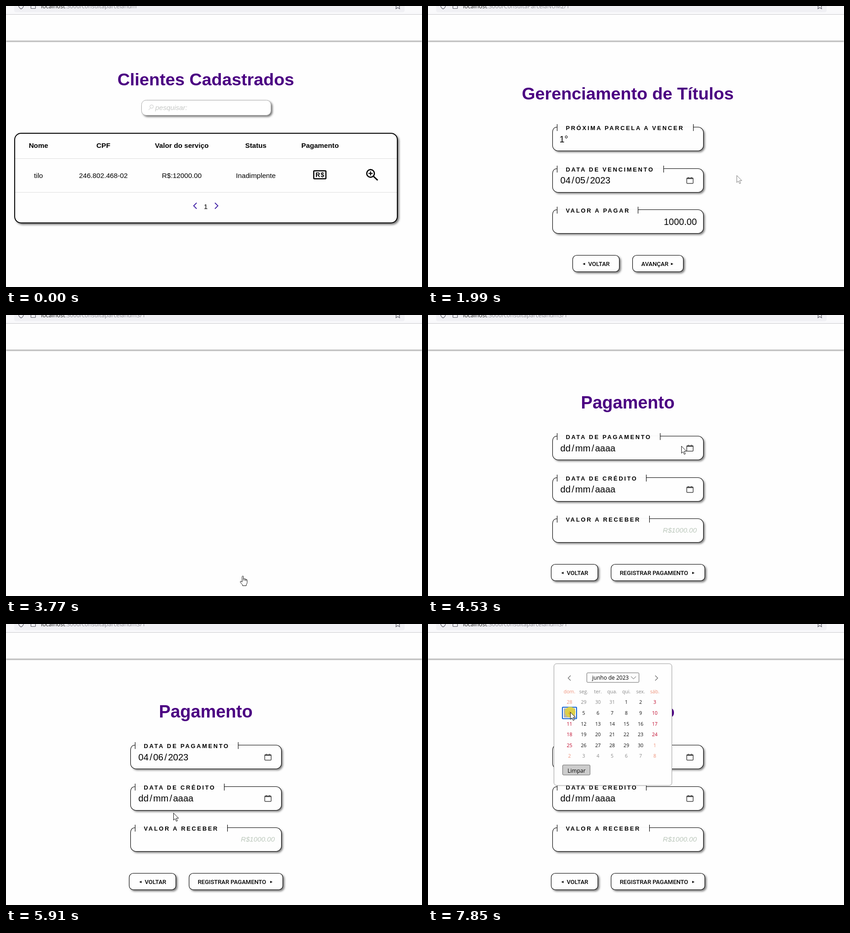
These frames come from a looping animation (910 by 616 pixels, 8 s). An HTML page:

```html
<!DOCTYPE html>
<html lang="pt-BR">
<head>
<meta charset="utf-8">
<title>Controle de parcelas</title>
<style>
html, body { margin: 0; width: 100%; height: 100%; overflow: hidden; background: #fefefe; }
svg { display: block; width: 910px; height: 616px; font-family: "Liberation Sans", Arial, sans-serif; }
.title { font-weight: bold; fill: #4b0082; text-anchor: middle; }
.cell { font-size: 15.2px; text-anchor: middle; }
.bold { font-weight: bold; }
.hint { font-size: 15.2px; font-style: italic; fill: #c6c8c6; }
.label { font-size: 12.8px; font-weight: bold; letter-spacing: 2.78px; }
.value { font-size: 20px; }
.button { font: 500 13px Roboto, sans-serif; }
.ui { font-family: "Open Sans", "Noto Sans", sans-serif; }
.line { fill: none; stroke: #000; }
.shadow { filter: drop-shadow(3px 3px 2px #777); }
</style>
</head>
<body>
<svg id="stage" viewBox="0 0 910 616"></svg>
<script>
const LOOP = 8000;
const stage = document.getElementById('stage');

const text = (x, y, cls, str, extra = '') => `<text x="${x}" y="${y}" class="${cls}" ${extra}>${str}</text>`;
const line = (d, color = '#000', width = 1, extra = '') =>
  `<path class="line" d="${d}" style="stroke:${color};stroke-width:${width}" ${extra}/>`;
const rect = (x, y, w, h, r, fill, stroke = 'none', width = 1, extra = '') =>
  `<rect x="${x}" y="${y}" width="${w}" height="${h}" rx="${r}" fill="${fill}" stroke="${stroke}" stroke-width="${width}" ${extra}/>`;
const group = (id, body) => `<g id="${id}">${body}</g>`;
const title = (y, size, str) => text(437, y, 'title', str, `font-size="${size}"`);

function browserBar() {
  return rect(0, 0, 910, 18, 0, '#f9f9fb') + rect(18, -20, 854, 33.5, 4, '#f0f0f4') +
    line('M0 18.5H910', '#cccccf') +
    line('M27.5-2C27.5 3 30 5 33 6.5 36 5 38.5 3 38.5-2', '#5b5b66', 1.2) +
    line('M54.5-2V4.5Q54.5 5.5 55.5 5.5H63.5Q64.5 5.5 64.5 4.5V-2', '#5b5b66', 1.2) +
    line('M852-1L853.5 1 853 6 857 3.5 861 6 860.5 1 862-1', '#5b5b66', 1.2) +
    `<text class="ui" x="76.5" y="5" font-size="12.6" fill="#8a8a92"><tspan fill="#222">localhost</tspan>:3000/<tspan id="path"></tspan></text>` +
    rect(0, 19, 910, 57, 0, '#fefefe', 'none', 1, 'style="filter:drop-shadow(0 2px 1.5px #999)"');
}

function clientPage() {
  const columns = [
    [71, 'Nome', 'tilo'], [213, 'CPF', '246.802.468-02'], [384.5, 'Valor do serviço', 'R$:12000.00'],
    [546.5, 'Status', 'Inadimplente'], [687, 'Pagamento', '']
  ];
  return title(174, 37.8, 'Clientes Cadastrados') +
    rect(296.5, 206.5, 283, 33, 10, '#fff', '#aaa', 1, 'class="shadow"') +
    '<circle cx="318.5" cy="220.5" r="3.8" class="line" style="stroke:#c6c8c6"/>' + line('M316 223.5L312 228', '#c6c8c6') +
    text(326.5, 228, 'hint', 'pesquisar:') +
    rect(19, 279, 837, 196.5, 14, '#fefefe', '#000', 2, 'class="shadow"') +
    line('M20 334.5H855M20 408.5H855', '#ddd') +
    columns.map(([x, head, body]) => text(x, 311, 'cell bold', head) + text(x, 377, 'cell', body)).join('') +
    rect(673.2, 361.2, 26.6, 17.6, 1.5, 'none', '#000', 2.5) +
    text(687, 375, 'cell bold', 'R$', 'style="font-size:14px;letter-spacing:1px"') +
    '<circle cx="797.5" cy="367" r="8.4" class="line" style="stroke-width:2.6"/>' +
    line('M793 367H802M797.5 362.5V371.5', '#000', 2.2) + line('M803.5 373L813 382', '#000', 3) +
    line('M417 431.5L410.5 438 417 444.5M457 431.5L463.5 438 457 444.5', '#3f1fa5', 1.8) +
    text(437, 445, 'cell', '1');
}

function field(y, label, tick, content) {
  const outline = `M283 ${y}Q272.5 ${y} 272.5 ${y + 12}V${y + 40}a12 12 0 0 0 12 12H590.5a12 12 0 0 0 12-12` +
    `V${y + 12}a12 12 0 0 0-12-12H${tick}M282.5 ${y - 6.5}v15M${tick} ${y - 6.5}v15`;
  return rect(272.5, y, 330, 52, 12, '#fefefe', 'none', 1, 'class="shadow"') + line(outline, '#000', 1.1) +
    text(301.5, y + 6.3, 'label', label) + content;
}

const dateParts = str => str.split('/')
  .map((part, i) => i ? `<tspan dx="2.3">/</tspan><tspan dx="2.3">${part}</tspan>` : part).join('');

function dateValue(y, str, id = '') {
  const icon = `M567.5 ${y + 21}h11q1.5 0 1.5 1.5v9q0 1.5-1.5 1.5h-11q-1.5 0-1.5-1.5v-9q0-1.5 1.5-1.5zM566 ${y + 22.5}h14M569.5 ${y + 19}v4M576.5 ${y + 19}v4`;
  return text(289.6, y + 33, 'value', dateParts(str), id && `id="${id}"`) +
    line(icon, '#444', 1.5, `class="icon" data-y="${y + 26}"`);
}

function button(x, w, str, textX, arrowX, dir) {
  return rect(x + .5, 546.5, w, 36, 9, '#fefefe', '#000', 1.1, 'class="shadow"') +
    `<path d="M${arrowX + 2.5 * dir} 565.5l${-5 * dir}-2.5v5z"/>` + text(textX, 570, 'button', str);
}

function titlesPage() {
  return title(205, 37.75, 'Gerenciamento de Títulos') +
    field(265.5, 'PRÓXIMA PARCELA A VENCER', 580.5, text(287.5, 298.5, 'value', '1°')) +
    field(356.5, 'DATA DE VENCIMENTO', 515.5, dateValue(356, '04/05/2023')) +
    field(446.5, 'VALOR A PAGAR', 459.5, text(588, 479.5, 'value', '1000.00', 'text-anchor="end"')) +
    button(316, 102, 'VOLTAR', 350.5, 341, -1) + button(447, 111, 'AVANÇAR', 466.5, 534, 1);
}

function calendar() {
  const names = ['dom.', 'seg.', 'ter.', 'qua.', 'qui.', 'sex.', 'sáb.'];
  const mid = 'text-anchor="middle"';
  let out = rect(-.5, -.5, 258, 267, 6, '#fefefe', '#999') +
    line('M36 25.5L30.5 31 36 36.5M221 25.5L226.5 31 221 36.5', '#666', 1.2) +
    rect(71.5, 19.5, 114, 21, 2, '#fefefe', '#666') + text(83, 34.6, 'ui', 'junho de 2023', 'font-size="12"') +
    line('M168 27.5L173.5 33 179 27.5', '#555') +
    rect(18, 95, 31, 25, 1, '#fefefe', '#0a5cd0', 2) + rect(21, 97.5, 25, 20, 1, '#b4b4b4');
  for (let i = 0; i < 49; i++) {
    const col = i % 7, row = Math.floor(i / 7), n = i - 10;
    const inMonth = row > 0 && n > 0 && n <= 30, weekend = col % 6 === 0;
    const label = row === 0 ? names[col] : n < 1 ? n + 31 : n > 30 ? n - 30 : n;
    const color = weekend ? (inMonth ? '#be0428' : '#ee9078') : inMonth ? '#111' : '#888';
    out += text(33.5 + 31.1 * col, (64.3 + 23.6 * row).toFixed(1), 'ui', label,
      `${mid} font-size="10.6" fill="${color}" font-weight="${n === 4 && inMonth ? 700 : inMonth ? 500 : 400}"`);
  }
  return out + rect(18.5, 221.5, 60, 22, 2, '#ccc', '#666') +
    text(49, 238, 'ui', 'Limpar', `${mid} font-size="12"`);
}

function paymentPage() {
  return title(205, 38, 'Pagamento') +
    field(265.5, 'DATA DE PAGAMENTO', 508, dateValue(265.5, 'dd/mm/aaaa', 'paid')) +
    field(356.5, 'DATA DE CRÉDITO', 477.5, dateValue(356, 'dd/mm/aaaa')) +
    field(446.5, 'VALOR A RECEBER', 484.5, text(588, 477, 'hint', 'R$1000.00', 'text-anchor="end" style="fill:#bcc8bc"')) +
    button(269, 102, 'VOLTAR', 303.5, 294, -1) +
    button(400, 205, 'REGISTRAR PAGAMENTO', 419.5, 580.5, 1) +
    group('calendar', calendar());
}

const pointer =
  '<path id="arrow" d="M.5.5V16L4 12.8 6.5 18.5 9 17.4 6.5 11.8H11.5Z" fill="#fff" stroke="#111"/>' +
  '<path id="hand" d="M-1.5 13V1.5Q-1.5.3 0 .3T1.5 1.5V6.5Q2 5.2 3.5 5.8L4.5 7Q6 6 7 7.5 9.5 7 9.5 10V14.5Q9.5 17 7.5 19V21.5H-.5V19.5L-5 14.5Q-6.5 11.5-4 11.5L-1.5 13.5M1.5 6V10M4.5 7V10.5M7 7.5V11" fill="#fff" stroke="#111" stroke-linejoin="round"/>';

stage.innerHTML = rect(0, 0, 910, 616, 0, '#fefefe') + browserBar() +
  group('clients', clientPage()) + group('titles', titlesPage()) + group('payment', paymentPage()) +
  '<circle id="click" r="11.5" fill="#e6d62e" opacity=".8"/>' + group('pointer', pointer);

// time, x, y of the pointer tip
const route = [
  [310, 730, 579], [460, 745, 468], [620, 825, 372], [780, 700, 335], [930, 590, 302], [1070, 492, 335],
  [1370, 419, 391], [1480, 440, 392], [1740, 675, 371], [2200, 675, 371], [2770, 583, 482], [3150, 500, 577],
  [3400, 518, 572], [4120, 518, 572], [4470, 543, 288], [4610, 569, 286], [4760, 571, 288], [4980, 571, 289],
  [5320, 401, 391], [5480, 309, 425], [5780, 309, 425], [6370, 565, 376], [6460, 572, 381], [6830, 572, 381],
  [6950, 570, 394], [7400, 311, 200], [7550, 311, 197], [7620, 311, 193], [LOOP, 311, 193]
];
const clicks = [[1770, 1920], [3480, 3640], [4760, 4870], [5620, 5700], [6760, 6850], [7850, LOOP]];
const within = (t, from, to) => t >= from && t < to;
const get = id => document.getElementById(id);
const show = (id, on) => { get(id).style.display = on ? '' : 'none'; };
const icons = [...document.querySelectorAll('.icon')];

function pointAt(t) {
  const i = Math.max(1, route.findIndex(step => step[0] > t));
  const [t0, x0, y0] = route[i - 1], [t1, x1, y1] = route[i];
  const p = Math.min(1, Math.max(0, (t - t0) / (t1 - t0)));
  return [x0 + (x1 - x0) * p, y0 + (y1 - y0) * p];
}

function setText(id, html) {
  const el = get(id);
  if (el.dataset.value !== html) { el.innerHTML = html; el.dataset.value = html; }
}

function draw(t) {
  const [x, y] = pointAt(t);
  const place = `translate(${Math.round(x)} ${Math.round(y)})`;
  const hand = within(t, 3080, 4150);
  show('clients', t < 1920);
  show('titles', within(t, 1990, 3700));
  show('payment', t >= 3850);
  show('calendar', within(t, 4870, 5700) || t >= 6850);
  get('calendar').setAttribute('transform', `translate(276 ${t < 6000 ? 318 : 87.5})`);
  setText('path', t < 1990 ? 'consultaparcelanum' : t < 3700 ? 'ConsultaParcelaNUM2/1' : 'consultaparcelanum3/1');
  setText('paid', dateParts(t < 5700 ? 'dd/mm/aaaa' : '04/06/2023'));
  show('pointer', t >= 310);
  show('arrow', !hand);
  show('hand', hand);
  get('pointer').setAttribute('transform', place);
  get('pointer').style.opacity = within(t, 1920, 2070) ? .55 : 1;
  show('click', clicks.some(([from, to]) => within(t, from, to)));
  get('click').setAttribute('transform', place);
  for (const icon of icons) {
    const hover = Math.abs(x - 573) < 8 && Math.abs(y - icon.dataset.y) < 8;
    icon.style.stroke = hover ? '#000' : '#444';
    icon.style.strokeWidth = hover ? 2.4 : 1.5;
  }
}

const start = performance.now();
function tick() {
  draw((performance.now() - start) % LOOP);
  requestAnimationFrame(tick);
}
tick();
</script>
</body>
</html>
```
